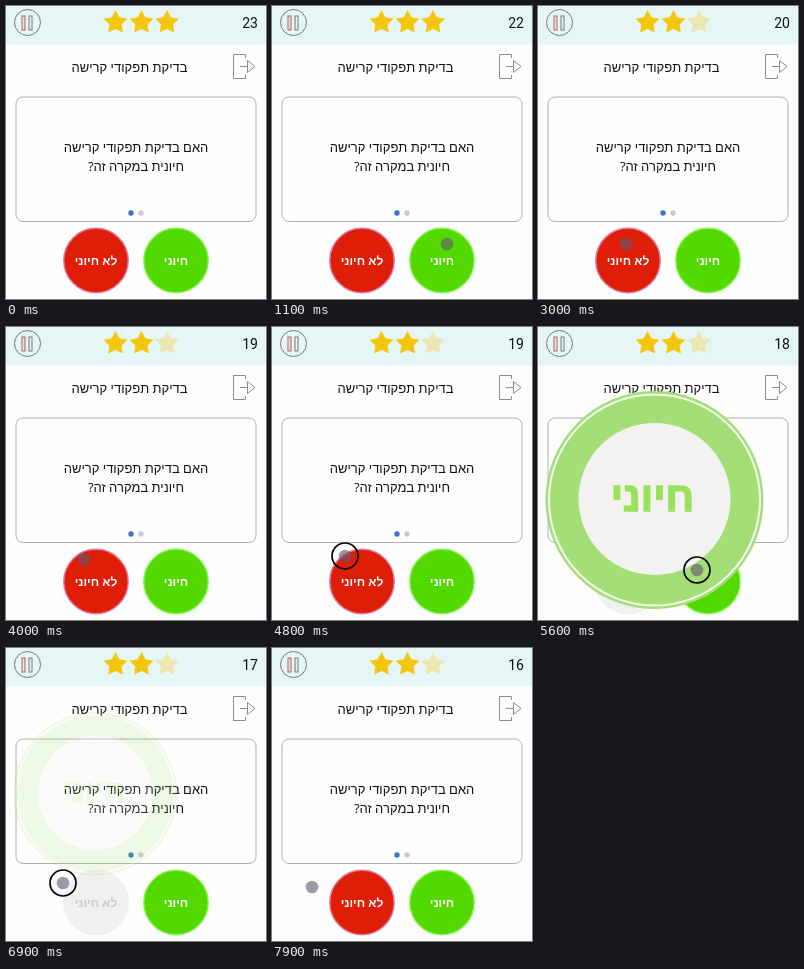
Write an HTML page that moves like this. It is 260 px wide and 293 px high and loops after 8000 ms.

```html
<!DOCTYPE html>
<html lang="he">
<head>
<meta charset="utf-8">
<style>
html, body { margin: 0; width: 100%; height: 100%; overflow: hidden; background: #fefefe; }
svg { display: block; width: 260px; height: 293px; }
text { font: 13px "Open Sans", "Liberation Sans", sans-serif; text-anchor: middle; direction: rtl; fill: #111; }
.bold { font-size: 12px; font-weight: 700; fill: #fff; }
#count { font: 14px Roboto, sans-serif; direction: ltr; }
#badge text { font-size: 41px; font-weight: 800; fill: #98e25c; stroke: #98e25c; stroke-width: 1.5px; }
.line { fill: none; stroke: #777; }
</style>
</head>
<body>
<svg viewBox="0 0 260 293">
  <defs><path id="star"/></defs>
  <rect width="260" height="38.5" fill="#e6f5f6"/>
  <g class="line">
    <circle cx="21.5" cy="16.5" r="13"/>
    <rect x="16" y="10" width="3" height="14" stroke="#a66" fill="#f3dede"/>
    <rect x="23" y="10" width="3" height="14"/>
    <path d="M239.5 52V48.5H227.5V72.5H239.5V69M234 60.5H241M241.5 54.5L249 60.5L241.5 66.5Z" stroke="#8c8c8c"/>
    <rect x="10" y="91" width="240" height="124.5" rx="7" stroke="#b0b0b0"/>
  </g>
  <g fill="#f4c60d">
    <use href="#star" x="109.5" y="16.5"/>
    <use href="#star" x="135.5" y="16.5"/>
    <use href="#star" x="161" y="16.5" id="last"/>
  </g>
  <text id="count" x="244" y="21.5"></text>
  <text x="123.5" y="66">בדיקת תפקודי קרישה</text>
  <text x="130" y="146">האם בדיקת תפקודי קרישה</text>
  <text x="130" y="165">חיונית במקרה זה?</text>
  <circle cx="125" cy="207" r="2.7" fill="#3a73c8"/>
  <circle cx="135" cy="207" r="2.7" fill="#c6cad2"/>

  <circle cx="90" cy="254.5" r="33" fill="#f0f0f0"/>
  <text x="90" y="259" class="bold" style="fill:#ccc">לא חיוני</text>
  <g id="no">
    <circle cx="90" cy="254.5" r="32.2" fill="#de1e06" stroke="#e277a0" stroke-width="1.4"/>
    <text x="90" y="259" class="bold">לא חיוני</text>
  </g>
  <circle cx="170" cy="254.5" r="32.2" fill="#53d800" stroke="#86f550" stroke-width="1.4"/>
  <text x="170" y="259" class="bold">חיוני</text>

  <g id="badge">
    <circle cx="109" cy="109" r="109" fill="#a4de76"/>
    <circle cx="109" cy="109" r="105.5" fill="none" stroke="#f6fbf2" stroke-width="2"/>
    <circle cx="109" cy="108" r="76" fill="#f3f2f1"/>
    <text x="107" y="120">חיוני</text>
  </g>

  <g id="cursor">
    <circle r="6.3" fill="#625a70" fill-opacity=".62"/>
    <circle id="ring" r="13" fill="none" stroke="#000" stroke-width="1.7"/>
  </g>
</svg>
<script>
const $ = id => document.getElementById(id);
const LOOP = 8000, STEP = 100;

// Rows of [time, ...values]
const pointer = [
  [500, 190, 275], [1000, 175, 238], [1600, 175, 238], [2300, 88, 238], [3200, 88, 238],
  [4400, 73, 229], [4900, 73, 229], [5400, 159, 243], [5900, 159, 243],
  [6700, 57, 235], [7000, 57, 235], [7600, 40, 239]
];
const badge = [[5100, .3, 0], [5500, 1, 1], [6400, 1, 1], [7000, .7, 0]];
const redButton = [[5000, 1], [5300, 0], [7000, 0], [7300, 1]];

function at(keys, t) {
  const i = keys.findIndex(k => k[0] > t);
  if (i < 0) return keys[keys.length - 1].slice(1);
  if (i === 0) return keys[0].slice(1);
  const a = keys[i - 1], b = keys[i], p = (t - a[0]) / (b[0] - a[0]);
  return a.slice(1).map((v, j) => v + (b[j + 1] - v) * p);
}

function starPath() {
  const points = Array.from({ length: 10 }, (_, i) => {
    const r = i % 2 ? 6.4 : 12.5, a = i * Math.PI / 5;
    return [r * Math.sin(a), -r * Math.cos(a)].map(v => v.toFixed(2));
  });
  return "M" + points.join("L") + "Z";
}

function show(id, on) { $(id).style.display = on ? "" : "none"; }

function draw(now) {
  const t = Math.floor(now % LOOP / STEP) * STEP;
  $("count").textContent = 23 - Math.floor(t / 1000);
  $("last").setAttribute("fill", t < 2000 ? "#f4c60d" : "#ece6b0");
  $("no").setAttribute("opacity", at(redButton, t)[0]);

  const [scale, alpha] = at(badge, t);
  $("badge").setAttribute("transform", `translate(7.5 64) scale(${scale})`);
  $("badge").setAttribute("opacity", alpha);

  const [x, y] = at(pointer, t);
  $("cursor").setAttribute("transform", `translate(${x} ${y})`);
  show("cursor", t >= 500);
  show("ring", t >= 4600 && t < 7200);
  requestAnimationFrame(draw);
}

$("star").setAttribute("d", starPath());
draw(performance.now());
</script>
</body>
</html>
```
